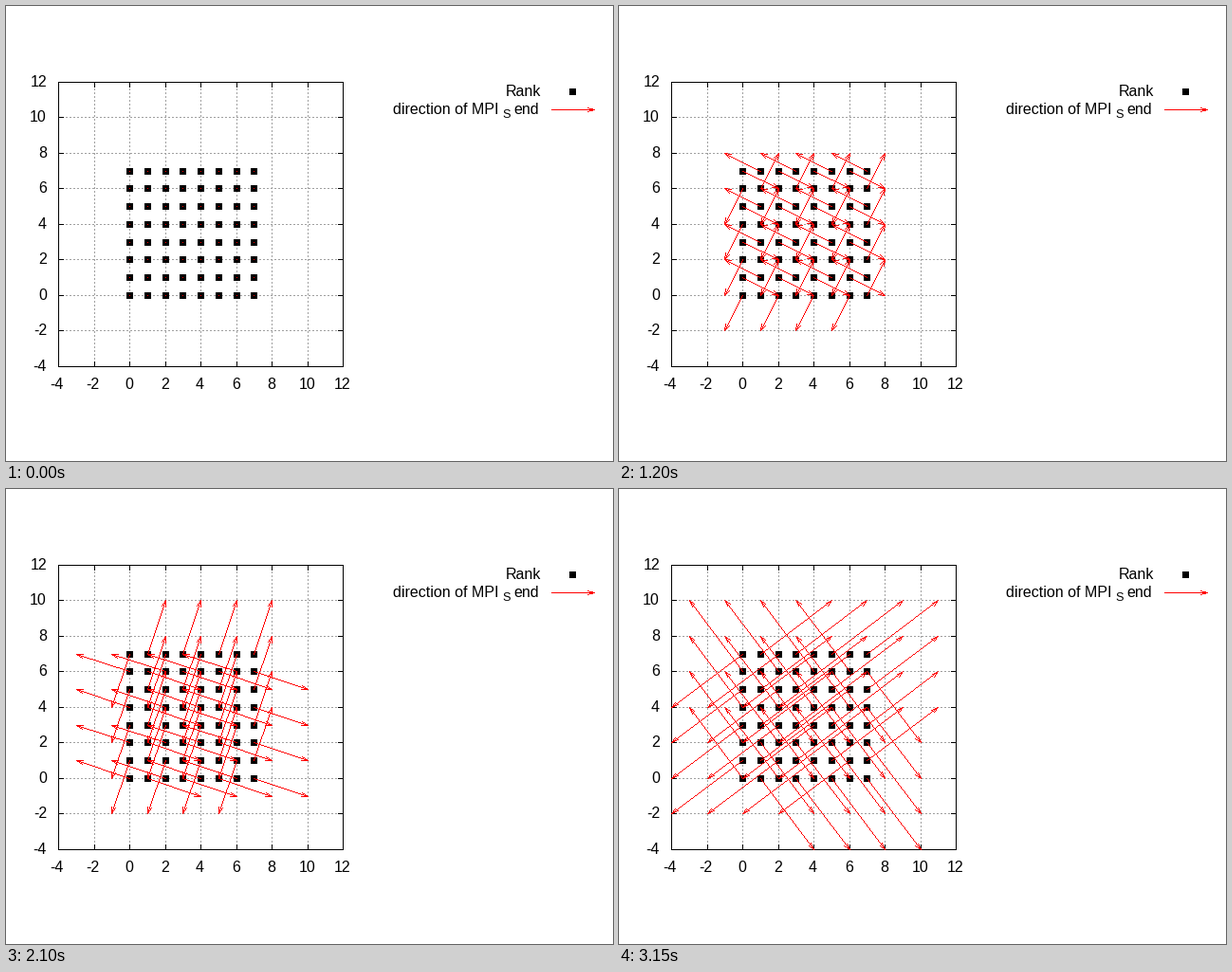
Write a matplotlib script that moves like this. It is 640 px wide and 480 px high and loops after 3.2 s.

```python
import math

import matplotlib.pyplot as plt
import numpy as np
from matplotlib.animation import FuncAnimation

W, H, DPI = 640, 480, 100
LEFT, RIGHT, TOP, BOTTOM = 55, 355, 80, 380
UNIT = 18.75
LOW, HIGH = -4, 12
N = 8
BLACK, GREY, RED = (0, 0, 0), (160, 160, 160), (255, 0, 0)
HEAD_LENGTH = 7
HEAD_ANGLE = math.radians(15)

plt.rcParams["font.family"] = "Liberation Sans"


def to_px(x, y):
    """Grid position to the nearest pixel."""
    return (LEFT + math.floor(UNIT * (x - LOW) + 0.5),
            BOTTOM - math.floor(UNIT * (y - LOW) + 0.5))


def ring(r):
    """Walk round the square ring of radius r, starting below the centre."""
    if r == 0:
        return [(0, 0)]
    walk = [(i, -r) for i in range(r)]
    walk += [(r, i) for i in range(-r, r)]
    walk += [(-i, r) for i in range(-r, r)]
    walk += [(-r, -i) for i in range(-r, r)]
    walk += [(i, -r) for i in range(-r, 0)]
    return walk


def torus_offsets():
    """Every offset on the N x N torus once, ring by ring."""
    seen, offsets = set(), []
    for r in range(N // 2 + 1):
        for dx, dy in ring(r):
            key = (dx % N, dy % N)
            if key not in seen:
                seen.add(key)
                offsets.append((dx, dy))
    return offsets


def line(canvas, start, end, color, dotted=False):
    """Hard-edged line, one pixel wide."""
    (x0, y0), (x1, y1) = start, end
    steps = max(abs(x1 - x0), abs(y1 - y0))
    xs = np.floor(np.linspace(x0, x1, steps + 1) + 0.5).astype(int)
    ys = np.floor(np.linspace(y0, y1, steps + 1) + 0.5).astype(int)
    if dotted:
        on = np.arange(steps + 1) % 4 < 2
        xs, ys = xs[on], ys[on]
    canvas[ys, xs] = color


def arrow(canvas, start, end):
    """Shaft with two barbs; a single dot if there is no length."""
    (x0, y0), (x1, y1) = start, end
    line(canvas, start, end, RED)
    head = min(HEAD_LENGTH, 0.3 * math.hypot(x1 - x0, y1 - y0))
    back = math.atan2(y0 - y1, x0 - x1)
    for turn in (-HEAD_ANGLE, HEAD_ANGLE):
        barb = (round(x1 + head * math.cos(back + turn)),
                round(y1 + head * math.sin(back + turn)))
        line(canvas, end, barb, RED)


def square(canvas, x, y):
    canvas[y - 3:y + 4, x - 3:x + 4] = BLACK


def label(x, y, text, align="left", size=16):
    ax.text(x - 0.5, y - 0.5, text, fontsize=size * 72 / DPI, ha=align,
            va="baseline", color="black")


def draw_axes(canvas):
    marks = [(v, *to_px(v, v)) for v in range(LOW, HIGH + 1, 2)]
    for v, x, y in marks[1:-1]:
        line(canvas, (x, BOTTOM), (x, TOP), GREY, dotted=True)
        line(canvas, (LEFT, y), (RIGHT, y), GREY, dotted=True)
    for v, x, y in marks:
        line(canvas, (x, BOTTOM), (x, BOTTOM - 5), BLACK)
        line(canvas, (x, TOP), (x, TOP + 5), BLACK)
        line(canvas, (LEFT, y), (LEFT + 5, y), BLACK)
        line(canvas, (RIGHT, y), (RIGHT - 5, y), BLACK)
        label(x - (2 if v < 0 else 0.5), 404, str(v), "center")
        label(43, y + 5, str(v), "right")
    corners = [(LEFT, TOP), (RIGHT, TOP), (RIGHT, BOTTOM), (LEFT, BOTTOM)]
    for i in range(4):
        line(canvas, corners[i - 1], corners[i], BLACK)


def draw_legend(canvas):
    label(564, 95, "Rank", "right")
    square(canvas, 597, 90)
    label(408, 114, "direction of MPI")
    label(523, 118, "S", size=12.8)
    label(535, 114, "end")
    arrow(canvas, (575, 109), (620, 109))


def send_vector(x, y, offset):
    """Odd rows turn the offset by 90 degrees, odd columns reverse it."""
    dx, dy = offset
    if y % 2:
        dx, dy = -dy, dx
    return (-dx, -dy) if x % 2 else (dx, dy)


fig = plt.figure(figsize=(W / DPI, H / DPI), dpi=DPI, facecolor="white")
ax = fig.add_axes([0, 0, 1, 1])
ax.axis("off")

ranks = [(x, y) for y in range(N) for x in range(N)]
offsets = torus_offsets()

backdrop = np.full((H, W, 3), 255, dtype=np.uint8)
draw_axes(backdrop)
draw_legend(backdrop)
for rank in ranks:
    square(backdrop, *to_px(*rank))
stage = ax.imshow(backdrop, interpolation="nearest", aspect="auto",
                  extent=(-0.5, W - 0.5, H - 0.5, -0.5))


def update(step):
    canvas = backdrop.copy()
    for x, y in ranks:
        dx, dy = send_vector(x, y, offsets[step])
        arrow(canvas, to_px(x, y), to_px(x + dx, y + dy))
    stage.set_data(canvas)
    return [stage]


anim = FuncAnimation(fig, update, frames=len(offsets), interval=50,
                     repeat=True, repeat_delay=0, blit=False)
plt.show()
```
